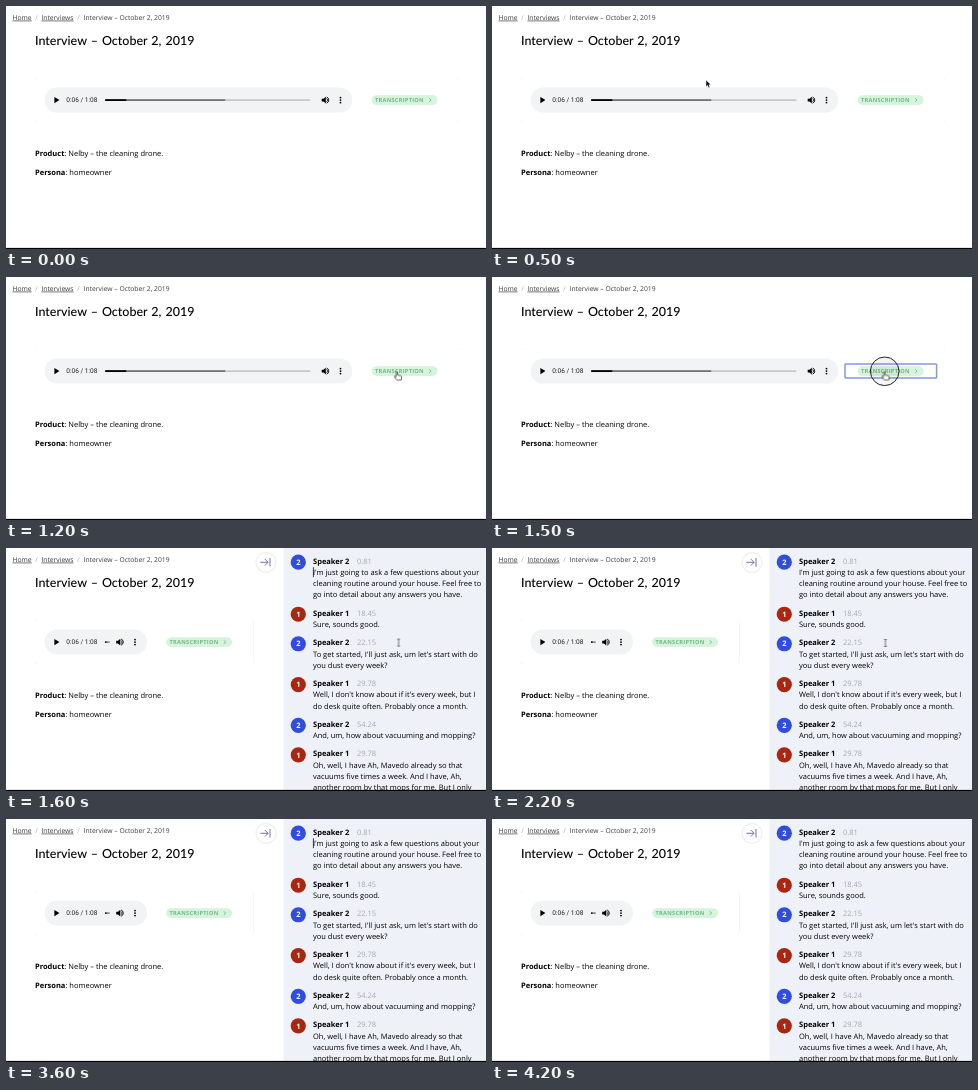
Write an HTML page that moves like this. It is 480 px wide and 243 px high and loops after 4.6 s.

```html
<!DOCTYPE html>
<html lang="en">
<head>
<meta charset="utf-8">
<title>Interview transcript</title>
<style>
html, body { margin: 0; width: 100%; height: 100%; overflow: hidden; background: #fff; }
svg { display: block; width: 100vw; height: 100vh; }
text { font: 7.5px "Open Sans", "Noto Sans", sans-serif; fill: #000; text-rendering: geometricPrecision; }
.bold { font-weight: 700; }
.crumb text { font-size: 6.75px; fill: #3c3c3c; }
.crumb .slash { fill: #aaa; }
.link { text-decoration: underline; text-decoration-thickness: .5px; text-underline-offset: 1px; }
.title { font: 500 12.5px Lato, "Open Sans", sans-serif; word-spacing: .8px; }
.time { font: 6.56px Roboto, Arial, sans-serif; fill: #222; }
.badge { font-size: 5.625px; font-weight: 700; letter-spacing: .05em; fill: #72b886; }
.num { font-weight: 700; fill: #fff; text-anchor: middle; }
.stamp { fill: #a4a9b2; }
.card { fill: #fff; filter: drop-shadow(0 .9px .6px rgba(0, 0, 0, .17)); }
.toggle { fill: #fff; filter: drop-shadow(0 .7px .8px rgba(0, 0, 0, .2)); }

#closed, #open, #press, #caret, #arrow, #hand, #beam { animation: 4600ms step-end infinite; }
#closed { animation-name: closed; }
#open { animation-name: open; }
#press { animation-name: press; }
#caret { animation-name: caret; }
#arrow { animation-name: arrow; }
#hand { animation-name: hand; }
#beam { animation-name: beam; }

@keyframes closed { 0% { visibility: visible } 34.78%, 100% { visibility: hidden } }
@keyframes open { 0% { visibility: hidden } 34.78%, 100% { visibility: visible } }
@keyframes press { 0% { visibility: hidden } 30.43% { visibility: visible } 34.78%, 100% { visibility: hidden } }
@keyframes caret {
  0%, 45.65%, 67.39%, 89.13%, 100% { visibility: hidden }
  34.78%, 56.52%, 78.26% { visibility: visible }
}
@keyframes arrow {
  0% { visibility: hidden; transform: translate(240px, 243px) }
  2.17% { visibility: visible; transform: translate(237px, 229px) }
  4.34% { visibility: visible; transform: translate(227px, 145px) }
  6.52% { visibility: visible; transform: translate(218px, 92.5px) }
  10.86% { visibility: visible; transform: translate(214px, 74px) }
  13.04% { visibility: visible; transform: translate(211px, 58px) }
  15.21% { visibility: visible; transform: translate(213px, 56px) }
  17.39% { visibility: visible; transform: translate(221.8px, 66.5px) }
  19.56% { visibility: visible; transform: translate(279px, 82px) }
  21.73% { visibility: visible; transform: translate(353px, 91px) }
  23.91%, 100% { visibility: hidden; transform: translate(353px, 91px) }
}
@keyframes hand {
  0% { visibility: hidden; transform: translate(384px, 94px) }
  23.91% { visibility: visible; transform: translate(384px, 94px) }
  26.08% { visibility: visible; transform: translate(391px, 94.5px) }
  28.26% { visibility: visible; transform: translate(392.5px, 94.5px) }
  34.78%, 100% { visibility: hidden; transform: translate(392.5px, 94.5px) }
}
@keyframes beam {
  0% { visibility: hidden; transform: translate(392.6px, 94.6px) }
  34.78% { visibility: visible; transform: translate(392.6px, 94.6px) }
  43.47% { visibility: visible; transform: translate(393.4px, 95px) }
  65.21%, 100% { visibility: hidden; transform: translate(393.4px, 95px) }
}
</style>
</head>
<body>
<svg viewBox="0 0 480 243" preserveAspectRatio="none">
  <defs>
    <g id="transport">
      <path d="M48.4 91v6.2l5-3.1z"/>
      <text class="time" x="60.2" y="96.4">0:06 / 1:08</text>
    </g>
    <g id="controls">
      <path d="M-3.8-1.3h1.8l2.3-2.1v6.8l-2.3-2.1h-1.8z"/>
      <path d="M1.1-1.6a1.9 1.9 0 0 1 0 3.2M1.1-3.1a3.3 3.3 0 0 1 0 6.2" fill="none" stroke="#000" stroke-width=".9"/>
      <circle cx="15" cy="-2.5" r=".9"/><circle cx="15" r=".9"/><circle cx="15" cy="2.5" r=".9"/>
    </g>
    <g id="badge">
      <rect y="-4.8" width="66" height="9.6" rx="4.8" fill="#d6f3dc"/>
      <text class="badge" x="3.4" y="2">TRANSCRIPTION</text>
      <path d="M57.7-1.8l1.7 1.8-1.7 1.8" fill="none" stroke="#72b886" stroke-width=".9"/>
    </g>
  </defs>

  <g class="crumb">
    <text class="link" x="6.5" y="13.6">Home</text>
    <text class="slash" x="29.2" y="13.6">/</text>
    <text class="link" x="35.4" y="13.6">Interviews</text>
    <text class="slash" x="71.3" y="13.6">/</text>
    <text x="77.6" y="13.6">Interview – October 2, 2019</text>
  </g>
  <text class="title" x="29" y="39">Interview – October 2, 2019</text>
  <text x="29" y="150.2"><tspan class="bold">Product</tspan>: Nelby – the cleaning drone.</text>
  <text x="29" y="168.9"><tspan class="bold">Persona</tspan>: homeowner</text>

  <g id="closed">
    <rect class="card" x="29" y="72" width="424" height="44" rx="2"/>
    <rect x="38.6" y="81.4" width="307.6" height="25.2" rx="12.6" fill="#f1f3f4"/>
    <use href="#transport"/>
    <rect x="99" y="93.2" width="205.5" height="1.8" rx=".9" fill="#c6c8c9"/>
    <rect x="99" y="93.2" width="120.5" height="1.8" rx=".9" fill="#717374"/>
    <rect x="99" y="93.2" width="21.5" height="1.8" rx=".9"/>
    <use href="#controls" x="319.5" y="94.1"/>
    <use href="#badge" x="365.6" y="94.1"/>
  </g>

  <g id="open">
    <rect class="card" x="29" y="72" width="218.3" height="44" rx="2"/>
    <rect x="38.6" y="81.4" width="102.4" height="25.2" rx="12.6" fill="#f1f3f4"/>
    <use href="#transport"/>
    <rect x="99" y="93.2" width="5" height="1.8" rx=".9" fill="#8a8c8d"/>
    <rect x="99" y="93.2" width="1.6" height="1.8" rx=".8"/>
    <use href="#controls" x="114" y="94.1"/>
    <use href="#badge" x="160.2" y="94.1"/>
    <rect x="277.5" width="202.5" height="243" fill="#eef2f8"/>
    <circle class="toggle" cx="260" cy="14.3" r="9.4"/>
    <path d="M254.3 14.3h7.6M258.8 11l3.3 3.3-3.3 3.3M264 10v8.6" fill="none" stroke="#5c5c9a" stroke-width=".85"/>
    <g id="talk"></g>
  </g>
  <path id="caret" d="M307.4 19.2v10" stroke="#111" stroke-width=".8"/>

  <g id="press">
    <rect x="353" y="87" width="91.6" height="14" rx=".8" fill="none" stroke="#8298dd" stroke-width="1.5"/>
    <circle cx="392.7" cy="94.3" r="14.3" fill="#000" fill-opacity=".04" stroke="#222" stroke-width="1"/>
  </g>

  <path id="arrow" d="M0 0v6.7l1.5-1.4 1.1 2.5 1.3-.6-1.1-2.4h2.1z" fill="#000" stroke="#fff" stroke-width=".5"/>
  <path id="hand" d="M-.9.5q.8-1 1.5 0v3l3.2.8q1 .3.9 1.4l-.5 2.9h-4.3l-2.7-3.3q.3-1.2 1.9.1z" fill="#fff" stroke="#222" stroke-width=".7" stroke-linejoin="round"/>
  <path id="beam" d="M-1.4-3.4h2.8M0-3.4v6.8M-1.4 3.4h2.8" fill="none" stroke="#222" stroke-width=".6"/>
  <rect y="241.9" width="480" height="1.1"/>
</svg>
<script>
const turns = [
  [2, "0.81", "I'm just going to ask a few questions about your", "cleaning routine around your house. Feel free to", "go into detail about any answers you have."],
  [1, "18.45", "Sure, sounds good."],
  [2, "22.15", "To get started, I'll just ask, um let's start with do", "you dust every week?"],
  [1, "29.78", "Well, I don't know about if it's every week, but I", "do desk quite often. Probably once a month."],
  [2, "54.24", "And, um, how about vacuuming and mopping?"],
  [1, "29.78", "Oh, well, I have Ah, Mavedo already so that", "vacuums five times a week. And I have, Ah,", "another room by that mops for me. But I only"]
];
const LINE = 11.25, GAP = 7.03;
const text = (x, y, s, cls = "") => `<text x="${x}" y="${y}" class="${cls}">${s}</text>`;

let y = 15.7, out = "";
for (const [who, stamp, ...lines] of turns) {
  out += `<circle cx="292.3" cy="${y - 1.5}" r="7.6" fill="${who === 2 ? "#304de0" : "#a92610"}"/>`
    + text(292.3, y + 1.2, who, "num")
    + text(307, y, "Speaker " + who, "bold")
    + text(351, y, stamp, "stamp");
  lines.forEach((line, i) => out += text(307, y + LINE * (i + 1), line));
  y += LINE * (lines.length + 1) + GAP;
}
document.getElementById("talk").innerHTML = out;
</script>
</body>
</html>
```
